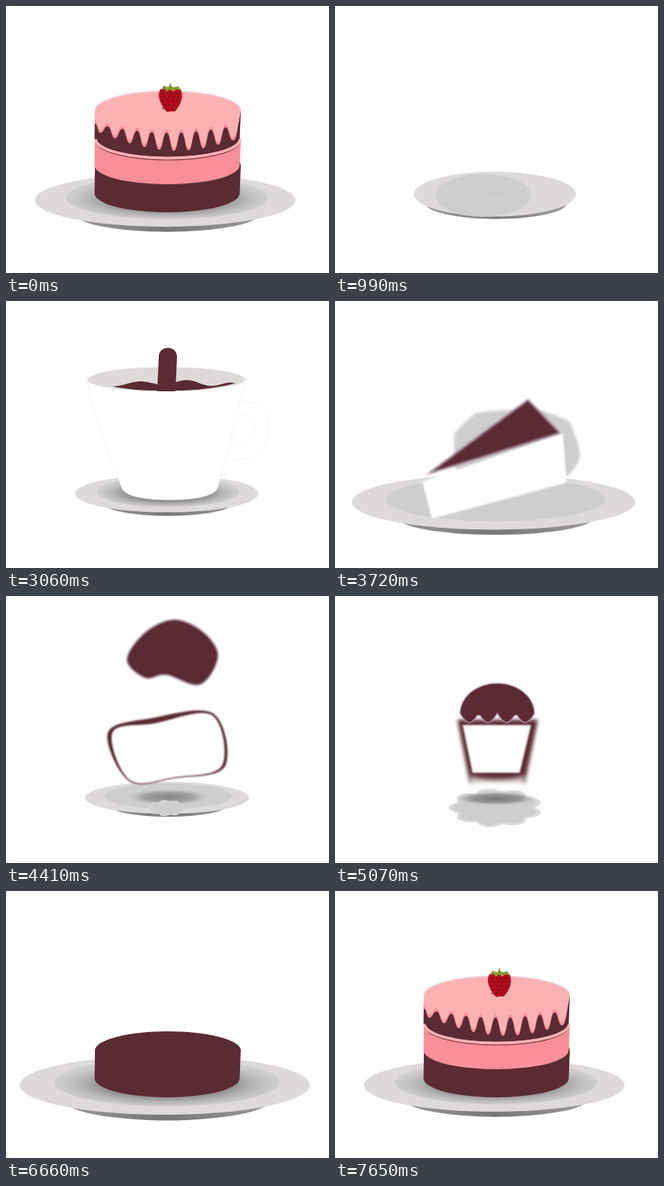
Recreate the animation shown at these times as an HTML page with a canvas. Size 425 by 352 pixels, loop 7680 ms.

```html
<!DOCTYPE html>
<html lang="en">
<head>
<meta charset="utf-8">
<title>Cakes and coffee</title>
<style>
  html, body { margin: 0; width: 100%; height: 100%; overflow: hidden; background: #fff; }
  canvas { display: block; }
</style>
</head>
<body>
<canvas id="stage" width="425" height="352"></canvas>
<script>
const ctx = document.getElementById('stage').getContext('2d');
const LOOP = 7680, STEP = 30, SAMPLES = 60;
const { PI, sin, cos, abs, floor } = Math;
const DARK = '#5a2b33', PINK = '#f98f99', ICING = '#fcb2b3', CHINA = '#dedada', GREY = '#cecece';
let time = 0;

const clamp = x => Math.max(0, Math.min(1, x));
const ramp = (from, to) => clamp((time - from) / (to - from));
const smooth = u => u * u * (3 - 2 * u);
const out = u => 1 - (1 - u) ** 3;
const lerp = (a, b, u) => a + (b - a) * u;
const mix = (a, b, u) => a.map((v, i) => lerp(v, b[i], u));
const during = (from, to) => time >= from && time < to;

// Starts at one pose and eases through legs of [from, to, pose], resting in between.
const travel = (pose, ...legs) => legs.reduce((p, [from, to, next]) => mix(p, next, smooth(ramp(from, to))), pose);

function group(draw, { x = 0, y = 0, cx = 0, cy = 0, sx = 1, sy = sx, alpha = 1, blur = 0 } = {}) {
  if (alpha <= 0 || sx <= 0 || sy <= 0) return;
  ctx.save();
  ctx.translate(cx + x, cy + y);
  ctx.scale(sx, sy);
  ctx.translate(-cx, -cy);
  ctx.globalAlpha *= alpha;
  if (blur > 0) ctx.filter = `blur(${blur}px)`;
  draw();
  ctx.restore();
}

function paint(shape, fill, stroke, width = 1) {
  if (fill) { ctx.fillStyle = fill; ctx.fill(shape); }
  if (stroke) { ctx.strokeStyle = stroke; ctx.lineWidth = width; ctx.stroke(shape); }
}
const path = (d, ...style) => paint(new Path2D(d), ...style);

function arc(cx, cy, rx, ry, from, to, ...style) {
  const shape = new Path2D();
  shape.ellipse(cx, cy, rx, ry, 0, from, to);
  paint(shape, ...style);
}
const ellipse = (cx, cy, rx, ry, fill) => arc(cx, cy, rx, ry, 0, 2 * PI, fill);

// ---- outlines: equally many samples each, so that any two can morph ----
const outline = pointAt => Array.from({ length: SAMPLES }, (_, i) => pointAt(i / SAMPLES)).flat();

const polygon = (...corners) => outline(u => {
  const k = u * corners.length, i = floor(k);
  return mix(corners[i], corners[(i + 1) % corners.length], k - i);
});

const spline = (...knots) => outline(u => {
  const n = knots.length, k = u * n, i = floor(k), s = k - i;
  const [a, b, c, d] = [n - 1, 0, 1, 2].map(j => knots[(i + j) % n]);
  return b.map((v, j) => v + s / 2 * (c[j] - a[j]
    + s * (2 * a[j] - 5 * v + 4 * c[j] - d[j] + s * (3 * (v - c[j]) + d[j] - a[j]))));
});

// Four corners plus the middles of the top and bottom edges.
const box = (tl, tr, br, bl) => polygon(tl, mix(tl, tr, .5), tr, br, mix(br, bl, .5), bl);

const scallop = (cx, cy, rx, ry, lobes, depth) => outline(u => {
  const r = 1 - depth + depth * abs(sin(lobes * PI * u));
  return [cx + rx * r * cos(2 * PI * u), cy + ry * r * sin(2 * PI * u)];
});

function trace(points, ...style) {
  const shape = new Path2D();
  for (let i = 0; i < points.length; i += 2) shape.lineTo(points[i], points[i + 1]);
  shape.closePath();
  paint(shape, ...style);
}

// ---- plate: centre x, centre y, radius x, radius y ----
const CUP_PLATE = [211.5, 254, 120.5, 24.6];
const SLICE_PLATE = [208.5, 265, 186.5, 36.4];
const CAKE_PLATE = [209.5, 256, 171.5, 35];
const SHADOW = [212, 267, 45, 8];

function plate() {
  const [cx, cy, rx, ry] = travel(CAKE_PLATE,
    [150, 420, [211, 365, 8, 8]], [420, 720, [211, 225, 48, 36]], [720, 990, [210.5, 248, 106.5, 29.5]],
    [990, 1200, CUP_PLATE], [3150, 3525, [208.5, 270, 208, 42]], [3525, 3690, SLICE_PLATE],
    [4290, 4410, [212, 266, 108, 21]], [4410, 4620, SHADOW],
    [6270, 6650, [209, 256, 191, 39]], [6650, 6960, CAKE_PLATE]);
  const formed = time < 150 ? 1 : smooth(ramp(990, 1200));
  const [dx, dy, wx, wy, footX, footY] = mix([-.146, .06, .59, .96, .87, .42], [.015, -.1, .776, .8, .71, .5], formed);
  const [size, strength] = travel([1, 1], [150, 420, [.2, .05]], [1230, 1590, [1, 1]],
    [3150, 3450, [0, 0]], [3780, 4290, [.65, .8]], [6270, 6650, [1, 1]]);

  const foot = ctx.createLinearGradient(cx - rx * .7, 0, cx + rx * .7, 0);
  ['#999', '#777', '#999'].forEach((color, i) => foot.addColorStop(i / 2, color));
  ellipse(cx + .015 * rx, cy + footY * ry, footX * rx, .69 * ry, foot);
  ellipse(cx, cy, rx, ry, CHINA);
  ellipse(cx + dx * rx, cy + dy * ry, wx * rx, wy * ry, GREY);
  shade(cx + .015 * rx, cy - .04 * ry, .776 * rx * size, .8 * ry * size, strength);
}

function shade(cx, cy, rx, ry, alpha) {
  const g = ctx.createRadialGradient(0, 0, 0, 0, 0, 1);
  g.addColorStop(0, 'rgba(110,110,110,.95)');
  g.addColorStop(.6, 'rgba(125,125,125,.7)');
  g.addColorStop(1, 'rgba(170,170,170,0)');
  group(() => ellipse(0, 0, 1, 1, g), { x: cx, y: cy, sx: rx, sy: ry, alpha });
}

// ---- cup ----
function cup() {
  path('M312 134C335 130 346 148 346 168C346 196 328 212 290 209M309 150C321 151 328 161 326 173C323 187 312 191 297 190Z',
    null, '#f5f4f5');
  path('M107 106C107 126 140 213 153 247C157 258 187 262 215 262C244 262 273 258 278 247L315 108Z', '#fff', '#f4f3f3');
  path('M107 105C108 93 153 87 211 87C270 87 316 94 315 105C305 114 258 119 211 119C160 119 116 115 107 105Z',
    CHINA, '#f4f2f2');
}

function coffee() {
  const level = out(ramp(2820, 3030)), phase = (time - 3060) / 90;
  ctx.save();
  ctx.beginPath();
  ctx.ellipse(211, 94, 112, 24.5, 0, 0, PI);
  ctx.clip();
  trace(outline(u => {
    const v = u / (1 - 1 / SAMPLES), x = 134 + 176 * v;
    const wave = (11.5 + (2 + 2.3 * v) * sin((x - 222) / 10 + phase)) * sin(PI * v) ** .2;
    return [x, 119 - level * wave];
  }), DARK);
  ctx.restore();

  const bottom = 119 * ramp(2730, 2850), top = -12 + 131 * ramp(2880, 3200);
  if (bottom - top > 12) {
    path(`M199 ${bottom}L201 ${top + 12}C201 ${top - 4} 225 ${top - 4} 225 ${top + 12}L223 ${bottom}Z`, DARK);
  }
}

// ---- slice turning into a cupcake ----
const SLICE_TOP = polygon([122, 228], [254, 130], [296, 174]);
const FLYING_TOP = spline([159, 84], [183, 48], [222, 31], [260, 48], [279, 80], [255, 117], [211, 104], [183, 108]);
const DOME = outline(u => u < .5
  ? [213.5 - 49 * cos(2 * PI * u), 155 - 40 * sin(2 * PI * u)]
  : [262.5 - 98 * (2 * u - 1), 155 + 12 * abs(sin(8 * PI * u))]);

const SLICE_SIDE = box([116, 239], [299, 175], [304, 239], [128, 286]);
const FLYING_CRUST = spline([134, 180], [192, 161], [273, 155], [288, 225], [222, 240], [162, 244]);
const FLYING_FILLING = spline([140, 180], [195, 168], [271, 157], [284, 224], [222, 239], [163, 243]);
const CUPCAKE_CRUST = box([161, 163], [267, 163], [250, 246], [177, 246]);
const CUPCAKE_FILLING = box([168, 170], [258, 170], [243, 233], [181, 233]);

const squash = v => Math.sign(v) * abs(v) ** .7;
const CREAM = outline(u => {
  const rise = squash(sin(2 * PI * u)), ripple = 1 - .04 * abs(sin(9 * PI * u));
  return [238 + 84 * ripple * squash(cos(2 * PI * u)), 204 + (rise > 0 ? 34 : 62) * ripple * rise];
});
const DOILY = scallop(211.5, 279, 62, 26, 9, .16);

const morph = (slice, flying, cupcake) => travel(slice, [4290, 4410, flying], [4410, 4740, cupcake]);

function doily() {
  const [size] = travel([.2], [4320, 4410, [.41]], [4410, 4680, [1]], [6210, 6390, [.3]]);
  group(() => {
    trace(DOILY, CHINA);
    group(() => trace(DOILY, GREY), { cx: 212, cy: 278, sx: .9 });
  }, { cx: 212, cy: 280, sx: size, alpha: 1 - ramp(6240, 6390) });
  shade(212, 267, 54 * ramp(4500, 4680), 9, 1 - ramp(6240, 6360));
}

function wrapper() {
  const grown = out(ramp(5100, 5700)), shrunk = smooth(ramp(5880, 6150));
  if (!grown) return;
  for (let i = 0; i < 6; i++) {
    const x = 178 + 14.4 * i, foot = 183 + 11.3 * i, y = 257 + 13 * sin(i / 2);
    const top = lerp(y, lerp(168, 221, shrunk), grown);
    path(`M${x - 2} ${top}Q${x} ${top - 4} ${x + 2} ${top}L${foot + 1} ${y}L${foot - 1} ${y}Z`, '#fab4b3');
  }
}

function dessert() {
  const leave = smooth(ramp(6210, 6600));
  const sliced = time < 4290;
  const soft = sliced ? 1.4 * (1 - ramp(3750, 3960)) : 1.2;
  const drop = { y: -300 * (1 - out(ramp(3510, 3690))), blur: soft };

  group(() => trace(CREAM, GREY, 'rgba(225,210,230,.6)', 2), { ...drop, alpha: 1 - ramp(4290, 4400) });

  const pink = mix([255, 255, 255], [249, 143, 153], ramp(5100, 5850));
  group(() => {
    group(() => trace(morph(SLICE_SIDE, FLYING_CRUST, CUPCAKE_CRUST), sliced ? '#fff' : DARK),
      { ...drop, blur: soft + 1.5 * ramp(4410, 4740) });
    group(() => path('M176 237Q212 247 251 237L247 252Q212 257 180 252Z', '#fff'), { blur: 3, alpha: .75 * ramp(4650, 4740) });
    group(() => trace(morph(SLICE_SIDE, FLYING_FILLING, CUPCAKE_FILLING), `rgb(${pink.map(floor)})`), drop);
  }, { cx: 212, cy: 245, sx: 1 + .7 * leave, sy: 1 - .4 * leave, alpha: 1 - ramp(6420, 6600) });
  group(wrapper, { alpha: 1 - ramp(6240, 6420) });

  const [lift, widen] = travel([0, 1], [6180, 6420, [-97, 1.1]], [6420, 6600, [-20, 1.8]]);
  group(() => trace(morph(SLICE_TOP, FLYING_TOP, DOME), DARK, 'rgba(190,165,195,.6)', 2),
    { y: drop.y + lift, cx: 212, cy: 140, sx: widen, sy: 1, blur: lerp(soft, .6, ramp(4410, 4740)), alpha: 1 - ramp(6540, 6660) });
}

// ---- layer cake ----
function layer(top, bottom, fill) {
  const shape = new Path2D();
  shape.ellipse(213, top, 96, 25, 0, PI, 2 * PI);
  shape.ellipse(212, bottom, 95.5, 25, 0, 0, PI);
  paint(shape, fill);
}

function icing(fill, raise, flow) {
  const shape = new Path2D();
  shape.ellipse(213, 138, 96, 26, 0, PI, 2 * PI);
  let px = 309, py = lerp(150, 165 - raise, flow);
  const flowTo = (x, y) => {
    const mid = (px + x) / 2, level = lerp(150, y - raise, flow);
    shape.bezierCurveTo(mid, py, mid, level, x, level);
    [px, py] = [x, level];
  };
  for (let i = 9; i >= 0; i--) {
    const bulge = sin(PI * (i + .3) / 11), x = 124 + 19.4 * i;
    flowTo(x, 165 + 26 * bulge);
    flowTo(Math.max(117, x - 9.7), 154 + 13 * bulge);
  }
  shape.closePath();
  paint(shape, fill);
}

function strawberry() {
  path('M203 110C208 106 225 106 230 110C234 120 230 129 224 137C221 141 219 138 216 139C213 141 210 139 208 135C202 127 199 117 203 110Z', '#b00d1c');
  ctx.fillStyle = '#5d0710';
  for (let row = 0; row < 5; row++) {
    for (let i = 0; i < 4 - (row > 2); i++) ctx.fillRect(206 + i * 6 + row % 2 * 2, 114 + row * 5, 1.3, 2);
  }
  path('M204 111L207 105L213 107L216 104L220 107L227 106L230 111L224 110L220 113L216 110L211 113L209 109Z', '#8b9a35');
  path('M216 107Q216 104 217 102', null, '#6c7a28', 1.2);
}

function cake() {
  const step = (from, to) => time < 150 ? 1 : out(ramp(from, to));
  const base = step(6420, 6690), filling = step(6660, 6900), crown = step(6750, 7080), flow = step(6930, 7410);
  group(() => layer(210, 247, DARK), { cx: 212, cy: 268, sx: .5 + .5 * base, sy: base });
  group(() => {
    layer(178, 210, PINK);
    arc(213, 178, 95, 25, 0, PI, null, DARK);
  }, { y: -80 * (1 - filling), alpha: filling });
  group(() => {
    layer(138, 174, DARK);
    arc(213, 175.5, 95, 25, 0, PI, null, ICING, 3.5);
  }, { y: -66 * (1 - crown), alpha: clamp(crown * 4) });
  group(() => {
    icing(PINK, 0, flow);
    icing(ICING, 4, flow);
    arc(213, 138, 96, 26, PI, 2 * PI, null, '#f1d3dc', 1.5);
  }, { cx: 213, cy: 138, sx: .2 + .8 * flow, alpha: clamp(flow * 4) });
  group(strawberry, { alpha: time < 150 ? 1 : ramp(7410, 7650) });
}

function draw() {
  ctx.clearRect(0, 0, 425, 352);
  if (time < 150) {
    group(() => { plate(); cake(); }, { alpha: 1 - time / 150 });
    return;
  }
  if (during(450, 4620) || time > 6270) plate();
  if (during(4320, 6420)) doily();
  if (during(1980, 3450)) {
    const leave = ramp(3180, 3420);
    group(() => {
      cup();
      if (time > 2730) coffee();
    }, { y: -270 * (1 - out(ramp(1950, 2550))), cx: 212, cy: 255, sx: 1 - .3 * leave, sy: 1 - .7 * leave, alpha: 1 - leave });
  }
  if (during(3510, 6660)) dessert();
  if (time > 6420) cake();
}

function frame() {
  time = floor(performance.now() % LOOP / STEP) * STEP;
  draw();
  requestAnimationFrame(frame);
}
frame();
</script>
</body>
</html>
```
